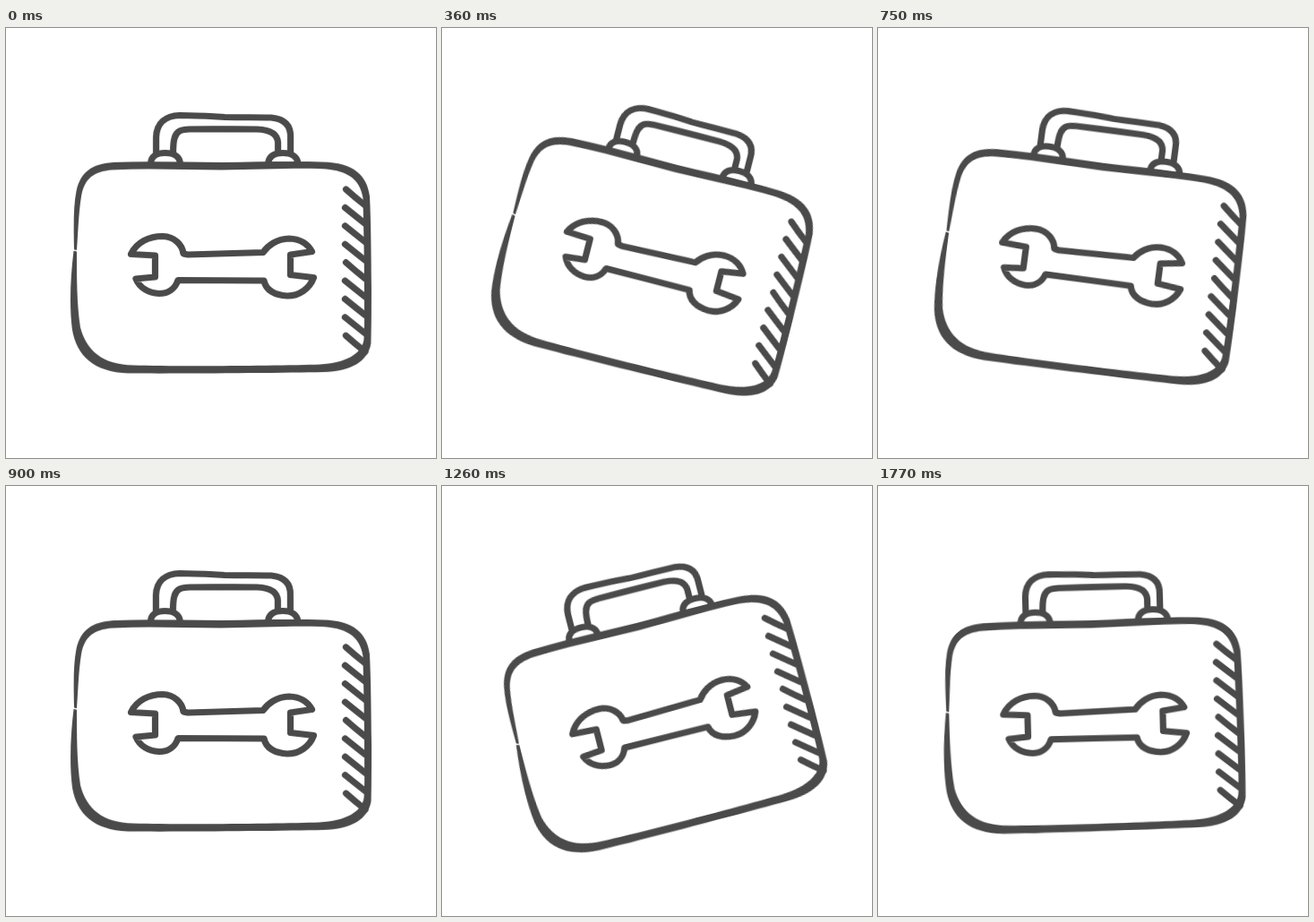
Recreate the animation shown at these times as an HTML page. Size 480 px wide and 480 px high, loop 1.8 s.

```html
<!DOCTYPE html>
<html lang="en">
<head>
<meta charset="utf-8">
<title>Toolbox</title>
<style>
  html, body { margin: 0; width: 100%; height: 100%; overflow: hidden; background: #fff; }
  svg { display: block; width: 100vw; height: 100vh; }
  .ink { fill: #4a4a4a; }
  .line { fill: none; stroke: #4a4a4a; stroke-width: 7.2; stroke-linejoin: round; stroke-linecap: round; }

  /* Bezier pieces of one sine wave */
  #box { transform-origin: 240px 240px; animation: rock 1800ms infinite; }
  @keyframes rock {
    0%   { transform: rotate(0deg); animation-timing-function: cubic-bezier(.3179, .5, .6358, 1); }
    25%  { transform: rotate(15deg); animation-timing-function: cubic-bezier(.3642, 0, .6358, 1); }
    75%  { transform: rotate(-15deg); animation-timing-function: cubic-bezier(.3642, 0, .6821, .5); }
    100% { transform: rotate(0deg); }
  }
</style>
</head>
<body>
<svg viewBox="0 0 480 480">
  <g id="box">
    <!-- handle -->
    <path class="line" d="M167.500 140V122C168 106 178 98 194 97.500C212 97.500 226 98.500 244 99.500C264 100 280 99.500 296 100C311 101.500 318 109 317.500 122V140"/>
    <path class="line" d="M186.500 140C186.500 133 186.500 128 188 123C190 115.500 195 113 205 113C230 113 255 112.500 280 113C294 113.500 303 118 303.500 128V140"/>

    <!-- hinges -->
    <g class="line" style="fill:#fff">
      <path d="M161.500 152C161.500 143 168 139.500 177.500 139.500C187 139.500 194 143 194.500 152"/>
      <path d="M292.500 152C293 143 299 139.500 309 139.500C319 139.500 325.500 144 326 152"/>
    </g>

    <!-- case -->
    <path class="ink" fill-rule="evenodd" d="
      M76 248C75.500 222 75 200 78.500 182C83 161 96 151.500 120 150C160 148.500 200 150 240 150C280 149.500 320 148.500 354 149.500
      C388 150.500 403 164 406 188C407.500 220 407.500 250 408 290C408 315 408 335 407.500 352C404 372 386 383 354 384
      C310 385 190 386 136 385.500C98 384 79 366 74 337C70.500 310 72 278 75.500 249Z
      M79 248C80.500 228 81 206 84 188C87.500 168 98 160 119 158.500C160 156.500 200 158.500 240 158.500C280 158 320 156 350 157
      C379 158 395 167 398.500 190C399 220 400 250 400 290C400 315 400.500 332 399.500 348C397 364 379 374 350 375.500
      C310 377 190 378 142 376.500C108 376 89.500 360 83 334C79 308 79 278 79 249Z"/>
    <path d="M73 247.500L82 249.500" stroke="#fff" stroke-width="1.300"/>

    <!-- wrench -->
    <path class="line" d="M139.500 252.500C146 239 160 232.500 175 232.500C188 233 197 242 198 252L203 253L287 250.500
      C292 243 302 235.500 316 235C330 235.500 337 241 341.500 249.500L317.500 253L317.500 275.500L343.500 278.500
      C339 291 327 299 314 299C301 298.500 290 293 288 282L192 281.500
      C189 291 181 296.500 171 296.500C159 296 149 290 145 280L166.500 278L166.500 254Z"/>

    <g id="hatch"></g>
  </g>
</svg>
<script>
  const hatch = document.getElementById("hatch");
  for (let i = 0; i < 9; i++) {
    const mark = document.createElementNS("http://www.w3.org/2000/svg", "path");
    const y = 180 + i * 20.4;
    mark.setAttribute("class", "line");
    mark.setAttribute("d", `M${i % 4 ? 378.5 : 379.5} ${y}Q389 ${y + 8.5} 401 ${y + 18}`);
    hatch.append(mark);
  }
</script>
</body>
</html>
```
